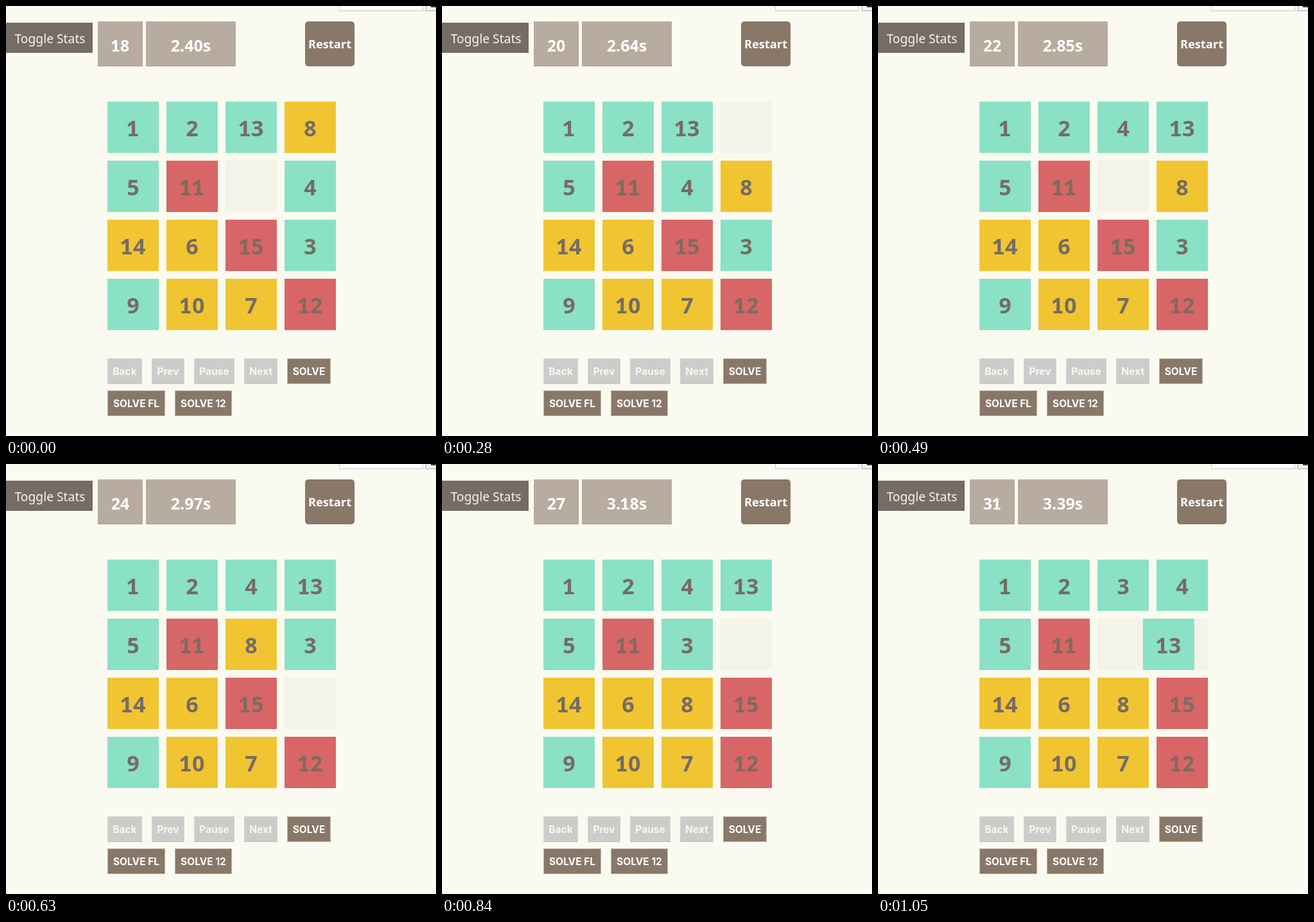
Recreate the animation shown at these times as an HTML page with a canvas. Size 670 px wide and 670 px high, loop 1120 ms.

```html
<!DOCTYPE html>
<html lang="en">
<head>
<meta charset="utf-8">
<title>Sliding puzzle solver</title>
<style>
  html, body { margin: 0; width: 100%; height: 100%; overflow: hidden; background: #fbfaf0; }
  canvas { display: block; }
</style>
</head>
<body>
<canvas id="stage" width="670" height="670"></canvas>
<script>
const ctx = document.getElementById('stage').getContext('2d');
const SANS = '"Noto Sans", "Open Sans", sans-serif';
const UI = 'Inter, "Liberation Sans", sans-serif';
const MINT = '#8ae1c5', GOLD = '#f1c531', RED = '#d86666';
const BROWN = '#897868', INK = '#756c64', CREAM = '#fbfaf0';

const STEP = 70, FRAMES = 16;
const START = [1, 2, 13, 8, 5, 11, 0, 4, 14, 6, 15, 3, 9, 10, 7, 12];
const HOLE = START.indexOf(0);
// Cells whose tile slides into the hole, one after another
const MOVES = [7, 3, 2, 6, 7, 11, 10, 6, 7, 3, 2, 6, 7];
// Moves made and clock ticks (30 ms each) at every step
const DONE = [0, 0, 0.23, 1, 2, 2, 3, 4, 5, 6, 7, 8, 9, 10, 11, 12.23];
const TICKS = [80, 82, 84, 86, 88, 90, 93, 95, 97, 99, 101, 104, 106, 108, 111, 113];

const cellX = i => 158 + 92 * (i % 4);
const cellY = i => 149 + 92 * Math.floor(i / 4);
const mix = (a, b, p) => a + (b - a) * p;

function rect(x, y, w, h, color) {
  ctx.fillStyle = color;
  ctx.fillRect(x, y, w, h);
}

function label(text, x, y, font, color) {
  ctx.font = font;
  ctx.fillStyle = color;
  ctx.textAlign = 'center';
  ctx.fillText(text, x, y);
}

// Centred numerals whose 1 stands on a foot
function numerals(text, cx, y, size, weight, color) {
  ctx.font = `${weight} ${size}px ${SANS}`;
  ctx.fillStyle = color;
  ctx.textAlign = 'left';
  let x = cx - ctx.measureText(text).width / 2;
  for (const ch of text) {
    const one = ch === '1';
    ctx.fillText(ch, x - (one ? size * 0.04 : 0), y);
    if (one) {
      const h = size * 0.11;
      ctx.fillRect(x + size * 0.085, y - h, size * 0.42, h);
    }
    x += ctx.measureText(ch).width;
  }
}

function tile(n, x, y) {
  const color = [11, 12, 15].includes(n) ? RED
    : [6, 7, 8, 10, 14].includes(n) ? GOLD : MINT;
  rect(x, y, 80, 80, color);
  numerals(String(n), x + 40, y + 54, 34, 600, n && color === RED ? '#806a61' : INK);
}

function board(done) {
  const cells = START.slice();
  let hole = HOLE;
  const full = Math.floor(done), part = done - full;
  for (const from of MOVES.slice(0, full)) {
    cells[hole] = cells[from];
    cells[from] = 0;
    hole = from;
  }
  const moving = part > 0 ? MOVES[full] : -1;
  for (let i = 0; i < 16; i++) rect(cellX(i), cellY(i), 80, 80, '#f4f3e8');
  cells.forEach((n, i) => {
    if (!n) return;
    const p = i === moving ? part : 0;
    tile(n, mix(cellX(i), cellX(hole), p), mix(cellY(i), cellY(hole), p));
  });
}

function button(text, x, y, w, on) {
  rect(x, y, w, 40, on ? '#bdb6ad' : '#d4d4d2');
  rect(x + 1, y + 1, w - 2, 38, on ? BROWN : '#cccccb');
  if (!on) rect(x, y + 39, w, 1, '#bfbfbd');
  label(text, x + w / 2, y + 26, `700 15.5px ${UI}`, on ? '#ffffff' : '#f8f8f1');
}

function stat(text, x, w) {
  rect(x, 24, w, 70, '#b8ab9f');
  rect(x, 93, w, 1, '#a99b8e');
  numerals(text, x + w / 2, 71, 25, 700, '#ffffff');
}

function browserEdge() {
  rect(519, 0, 131, 8, '#c9c9c6');
  rect(520, 0, 129, 7, '#ffffff');
  rect(654, 0, 16, 8, '#a9a9a6');
  rect(655, 0, 15, 7, '#f1f1f0');
  rect(662, 0, 8, 2, '#333333');
}

function draw(now) {
  const k = Math.floor(now / STEP) % FRAMES;
  rect(0, 0, 670, 670, CREAM);
  browserEdge();

  rect(0, 26, 135, 47, INK);
  label('Toggle Stats', 68.5, 58, `500 19.3px ${SANS}`, '#f8f5ee');
  stat(String(18 + Math.ceil(DONE[k])), 143, 70);
  stat((TICKS[k] * 0.03).toFixed(2) + 's', 218, 140);

  ctx.fillStyle = BROWN;
  ctx.beginPath();
  ctx.roundRect(466, 24, 77, 70, 5);
  ctx.fill();
  label('Restart', 504.5, 66, `700 18.3px ${SANS}`, '#ffffff');

  board(DONE[k]);

  button('Back', 158, 549, 54);
  button('Prev', 227, 549, 51);
  button('Pause', 293, 549, 63);
  button('Next', 371, 549, 52);
  button('SOLVE', 438, 549, 68, true);
  button('SOLVE FL', 158, 599, 90, true);
  button('SOLVE 12', 263, 599, 89, true);
}

const t0 = performance.now();
function loop() {
  draw(performance.now() - t0);
  requestAnimationFrame(loop);
}
loop();
</script>
</body>
</html>
```
